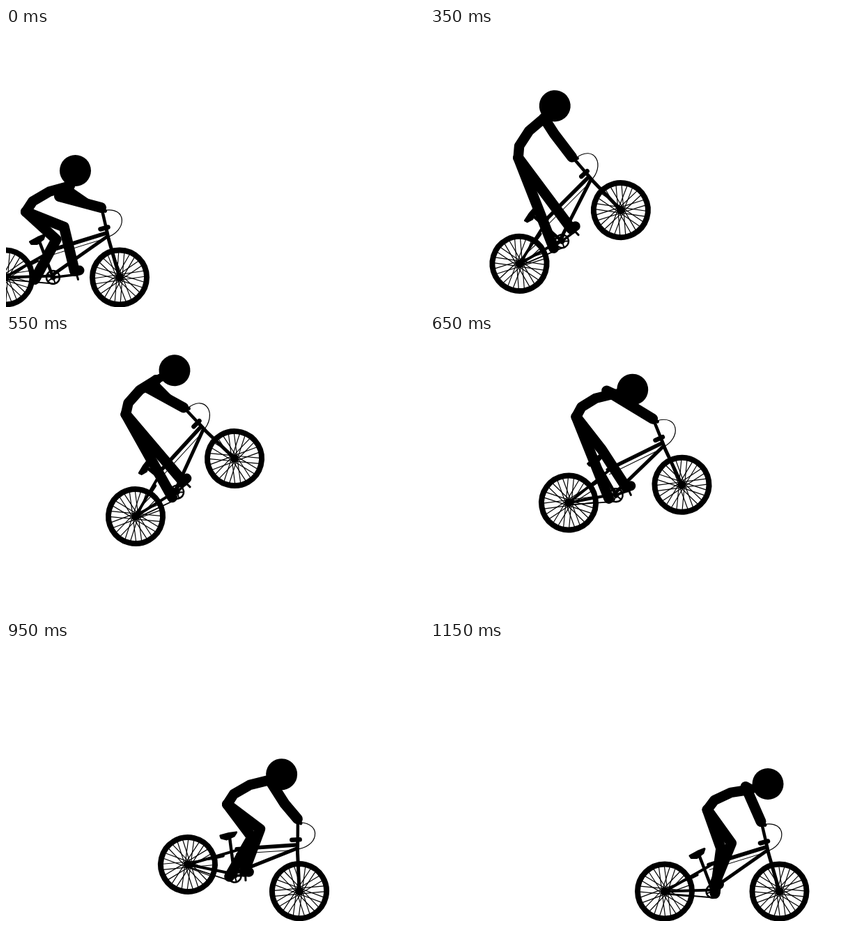
An HTML page with a canvas that plays this animation: 600 by 400 pixels, repeating every 1200 ms.

```html
<!DOCTYPE html>
<html lang="en">
<head>
<meta charset="utf-8">
<title>Bike hop</title>
<style>
html, body { margin: 0; width: 100%; height: 100%; overflow: hidden; background: #fff; }
canvas { display: block; width: 600px; height: 400px; }
</style>
</head>
<body>
<canvas id="c" width="600" height="400"></canvas>
<script>
const ctx = document.getElementById('c').getContext('2d');
const LOOP = 1200, STEP = 50;
const BASE = 164.5, GROUND = 357.5;
const THIGH = 59, SHIN = 65, BOW = 8;
const GRIP = [138, -100];

// time, rear hub x, y, tilt in degrees
const ride = [
  [0, -1.5, 357.5, 0], [200, 73, 356.5, -5.7], [450, 163, 316, -40.5],
  [550, 186, 260, -30.3], [650, 199, 240.5, -9], [850, 237, 247, 28.3],
  [950, 261, 319, 13.4], [1050, 301, 357, 0], [1150, 337, 357.5, 0]
];

// time, then hip, neck, head and elbow in bike space, and half the distance of the feet
const poses = [
  [0, 30, -94, 93, -131, 101, -153, 78, -116, 32],
  [200, 32, -121, 84, -169, 97, -191, 107, -135, 30],
  [450, 85, -139, 149, -162, 176, -162, 136, -144, 16],
  [650, 30, -120, 88, -144, 116, -146, 79, -150, 17],
  [850, 17, -75, 62, -125, 67, -148, 98, -117, 16],
  [950, 35, -97, 86, -145, 101, -157, 115, -117, 13],
  [1150, 61, -117, 123, -146, 148, -154, 116, -150, 3]
];

// Smooth curve through the rows, at time t
function sample(rows, t) {
  const last = rows.length - 1;
  let i = 0;
  while (i < last - 1 && t >= rows[i + 1][0]) i++;
  const slope = (k, j) => {
    const a = rows[Math.max(k - 1, 0)], b = rows[Math.min(k + 1, last)];
    return (b[j] - a[j]) / (b[0] - a[0]);
  };
  const h = rows[i + 1][0] - rows[i][0], u = (t - rows[i][0]) / h, v = 1 - u;
  return rows[i].map((p, j) =>
    p * (1 + 2 * u) * v * v + rows[i + 1][j] * u * u * (3 - 2 * u) +
    h * u * v * (v * slope(i, j) - u * slope(i + 1, j))).slice(1);
}

function path(pts) {
  ctx.beginPath();
  for (let i = 0; i < pts.length; i += 2) ctx.lineTo(pts[i], pts[i + 1]);
}

function line(width, ...pts) {
  ctx.lineWidth = width;
  path(pts);
  ctx.stroke();
}

function solid(width, ...pts) {
  line(width, ...pts);
  ctx.fill();
}

function disc(x, y, r) {
  ctx.beginPath();
  ctx.arc(x, y, r, 0, 7);
  ctx.fill();
}

function ring(x, y, r, width) {
  ctx.lineWidth = width;
  ctx.beginPath();
  ctx.arc(x, y, r, 0, 7);
  ctx.stroke();
}

function wheel(x, spin) {
  ctx.save();
  ctx.translate(x, 0);
  ring(0, 0, 39, 8);
  disc(0, 0, 6);
  ctx.rotate(spin);
  for (let i = 0; i < 28; i++) {
    ctx.rotate(Math.PI / 14);
    line(1.2, 0, i % 2 ? 4 : -4, 36, 0);
  }
  ctx.restore();
}

function bike(spin, px, py) {
  wheel(0, spin);
  wheel(BASE, spin);
  line(4, 0, 0, 65, -37);                      // stays
  line(4, 0, 0, 69, -2);
  line(1.8, 0, 3, 69, 9);                      // chain
  line(5, 38, -20, 46, -24);                   // brake
  line(4.5, 50, -50, 69, 0);                   // seat tube
  line(5.5, 63, -38, 144, -63);                // top tube
  line(5, 146, -58, 69, -4);                   // down tube
  line(1, 64, -31, 80, -36, 145, -56);         // cable
  line(5, 145, -72, 149, -54, BASE, 0);        // fork
  line(4.5, 139, -98, 145, -72);
  line(6.5, 137, -69, 148, -72);               // stem
  line(5, 134, -100, 144, -95);
  ctx.lineWidth = 1.2;                         // brake hose
  ctx.beginPath();
  ctx.moveTo(142, -96);
  ctx.bezierCurveTo(176, -102, 176, -66, 145, -57);
  ctx.stroke();
  solid(3, 36, -51, 47, -57, 57, -61, 55, -55, 46, -48, 38, -48, 36, -51);  // saddle
  ring(69, 0, 9.5, 2.5);                       // sprocket
  disc(69, 0, 4);
  for (let i = 0; i < 5; i++) {
    const a = i * Math.PI * .4 + spin;
    line(2, 69, 0, 69 + 9 * Math.cos(a), 9 * Math.sin(a));
  }
  line(3.5, 69, 0, px, py);                    // crank and pedal
  line(3, px - 2, py - 7, px + 2, py + 7);
}

// The knee always bends forwards
function leg(hx, hy, fx, fy) {
  const dx = fx - hx, dy = fy - hy, d = Math.hypot(dx, dy);
  const reach = Math.max(d, THIGH + SHIN);
  const along = d < reach ? (d * d + THIGH ** 2 - SHIN ** 2) / (2 * d) : THIGH;
  const out = Math.sqrt(Math.max(0, THIGH ** 2 - along ** 2));
  line(15, hx, hy, hx + (dx * along + dy * out) / d, hy + (dy * along - dx * out) / d, fx, fy);
}

function spine(hx, hy, nx, ny) {
  const dx = nx - hx, dy = ny - hy, k = BOW / Math.hypot(dx, dy);
  const bend = u => [hx + dx * u + dy * k, hy + dy * u - dx * k];
  line(14.5, hx, hy, ...bend(.22), ...bend(.6), nx, ny);
}

function draw(t) {
  const [x, y, tilt] = sample(ride, t);
  const [hx, hy, nx, ny, headX, headY, ex, ey, stance] = sample(poses, t);
  const near = 75 + stance, far = 75 - stance;
  ctx.clearRect(0, 0, 600, 400);
  ctx.lineCap = ctx.lineJoin = 'round';
  ctx.save();
  ctx.translate(x, Math.min(y, GROUND));
  ctx.rotate(tilt * Math.PI / 180);
  bike(x / 43, near - 4, -4);
  leg(hx, hy, far, 3);
  leg(hx, hy, near - 7, -9);
  line(14, near - 7, -9, near, -10);
  spine(hx, hy, nx, ny);
  solid(15, nx, ny, ex, ey, ...GRIP);
  line(12, nx, ny, headX, headY);
  disc(headX, headY, 22.5);
  ctx.restore();
}

function tick() {
  draw(Math.floor(performance.now() % LOOP / STEP) * STEP);
  requestAnimationFrame(tick);
}
tick();
</script>
</body>
</html>
```
